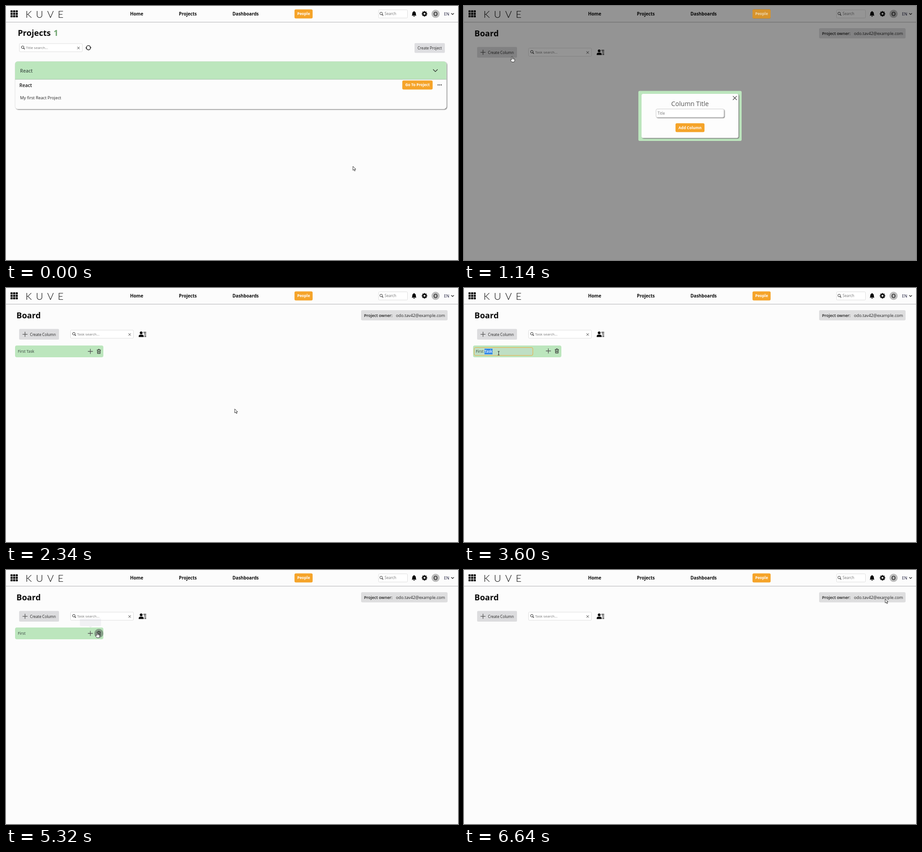
Animation, 998 px wide and 561 px high, one loop 6660 ms. Source, as an HTML page with a canvas:

```html
<!DOCTYPE html>
<html lang="en">
<head>
<meta charset="utf-8">
<title>Project board</title>
<style>
html, body { margin: 0; width: 100%; height: 100%; overflow: hidden; background: #fcfcfc; }
canvas { display: block; width: 998px; height: 561px; }
</style>
</head>
<body>
<canvas id="stage" width="998" height="561"></canvas>
<script>
const W = 998, H = 561, LOOP = 6660;
const BG = '#fcfcfc', ORANGE = '#f5a42a', GREEN = '#bce6bd', INK = '#0a0a0a';
const FONT = '"Open Sans", "Noto Sans", sans-serif';
const view = document.getElementById('stage').getContext('2d');
const page = document.createElement('canvas');
page.width = W;
page.height = H;
const pageCtx = page.getContext('2d');
let c = pageCtx;

const OPEN_BOARD = 560, FADE = 80;
const ADD = { open: 940, close: 2120 };
const DEL = { open: 5350, close: 6170 };
const EDIT = { start: 2860, select: 3160, erase: 3760, end: 4400 };

// time, x, y of the pointer tip
const PATH = [
  [0, 766, 354], [60, 766, 354], [400, 906, 172], [540, 906, 172], [880, 106, 111],
  [1230, 106, 111], [1420, 490, 238], [1810, 490, 238], [1960, 505, 267], [2360, 505, 267],
  [2640, 70, 142], [2960, 70, 142], [3060, 76, 144], [4780, 76, 144], [5000, 184, 138],
  [5200, 184, 138], [5300, 201, 137], [5450, 201, 137], [5740, 495, 245], [6190, 495, 245],
  [6580, 930, 64], [LOOP, 930, 64]
];
const POINTERS = [
  [0, 'arrow'], [360, 'hand'], [OPEN_BOARD, 'arrow'], [860, 'hand'], [1250, 'arrow'],
  [1390, 'beam'], [1850, 'arrow'], [1920, 'hand'], [2160, 'arrow'], [2600, 'beam'],
  [4800, 'arrow'], [4960, 'hand'], [5470, 'arrow'], [5690, 'hand'], [6200, 'arrow']
];
const ARROW = new Path2D('M0 0V9L2.1 7.1L3.7 10.4L5.2 9.7L3.7 6.5H6.4Z');
const HAND = new Path2D('M-1 1Q0 -.8 1 1V5Q2 4 3 5.1Q4 4.4 4.8 5.6Q6 5.2 6 6.8V9Q5.8 11 4.8 12.6H-.5Q-2 10.4 -3.6 8Q-3.3 6.3 -1 8Z');
const BELL = new Path2D('M0 -6Q1 -6 1 -5Q4 -4 4 0Q4 3 5.2 4H-5.2Q-4 3 -4 0Q-4 -4 -1 -5Q-1 -6 0 -6ZM-1.7 4.8H1.7Q1.3 6.4 0 6.4Q-1.3 6.4 -1.7 4.8Z');

const clamp = v => Math.max(0, Math.min(1, v));
const within = (t, a, b) => t >= a && t < b;

function text(s, x, y, size, weight = 400, color = INK, align = 'left') {
  c.font = `${weight} ${size}px ${FONT}`;
  c.textAlign = align;
  c.fillStyle = color;
  c.fillText(s, x, y + size * 0.357);
}

function box(x, y, w, h, r, fill, border) {
  c.beginPath();
  c.roundRect(x, y, w, h, r);
  if (fill) { c.fillStyle = fill; c.fill(); }
  if (border) { c.strokeStyle = border; c.lineWidth = 1; c.stroke(); }
}

function shadowBox(x, y, w, h, r, fill, border) {
  c.save();
  c.shadowColor = '#777';
  c.shadowOffsetX = c.shadowOffsetY = 1.5;
  c.shadowBlur = 2;
  box(x, y, w, h, r, fill);
  c.restore();
  if (border) box(x, y, w, h, r, null, border);
}

// each run is a flat list of x, y pairs
function lines(color, width, ...runs) {
  c.strokeStyle = color;
  c.lineWidth = width;
  c.beginPath();
  for (const p of runs) {
    c.moveTo(p[0], p[1]);
    for (let i = 2; i < p.length; i += 2) c.lineTo(p[i], p[i + 1]);
  }
  c.stroke();
}

function disc(x, y, r, color) {
  c.beginPath();
  c.arc(x, y, r, 0, 2 * Math.PI);
  c.fillStyle = color;
  c.fill();
}

const cross = (x, y, r, w, color = '#444') =>
  lines(color, w, [x - r, y - r, x + r, y + r], [x + r, y - r, x - r, y + r]);
const plus = (x, y, color = '#555') =>
  lines(color, 1.3, [x - 5.5, y, x + 5.5, y], [x, y - 5.5, x, y + 5.5]);

function button(label, x, y, w, h, size = 8.4) {
  box(x, y, w, h, 3, ORANGE);
  text(label, x + w / 2, y + h / 2, size, 700, '#fff', 'center');
}

function lens(x, y) {
  c.beginPath();
  c.arc(x - 0.7, y - 0.8, 2.8, 0, 2 * Math.PI);
  c.strokeStyle = '#222';
  c.lineWidth = 1;
  c.stroke();
  lines('#222', 1.2, [x + 1.3, y + 1.2, x + 3.8, y + 3.7]);
}

function searchField(label, x, y) {
  box(x + 0.5, y + 0.5, 139, 18, 2, '#fff', '#dedede');
  lens(x + 8.5, y + 9.3);
  text(label, x + 15, y + 10, 8, 400, '#757575');
  cross(x + 131, y + 10.2, 2.7, 1);
}

function gear(x, y) {
  c.save();
  c.translate(x, y);
  disc(0, 0, 4.5, INK);
  for (let i = 0; i < 8; i++) {
    c.fillRect(-1.4, -6, 2.8, 3);
    c.rotate(Math.PI / 4);
  }
  disc(0, 0, 2, BG);
  c.restore();
}

function navbar() {
  c.fillStyle = '#bdbfc1';
  c.fillRect(0, 35, W, 1);
  c.fillStyle = '#ececec';
  c.fillRect(0, 36, W, 1);
  for (let i = 0; i < 9; i++) box(10 + (i % 3) * 5.7, 9.5 + Math.floor(i / 3) * 5.5, 4.6, 4.5, 0.6, INK);
  c.font = '300 22px Lato, "Open Sans", sans-serif';
  c.textAlign = 'left';
  c.letterSpacing = '1.5px';
  c.fillText('K U V E', 43, 26);
  c.letterSpacing = '0px';
  text('Home', 288.5, 18, 9.8, 700, INK, 'center');
  text('Projects', 401.5, 18, 9.8, 700, INK, 'center');
  text('Dashboards', 529, 18, 9.8, 700, INK, 'center');
  button('People', 637, 7.5, 40, 20);
  box(822.5, 8.5, 64, 18, 2, '#fff', '#dedede');
  lens(829, 17.3);
  text('Search', 836, 17.5, 8.2, 400, '#757575');
  c.save();
  c.translate(901, 17.3);
  c.fillStyle = INK;
  c.fill(BELL);
  c.restore();
  gear(924, 17.3);
  disc(948.5, 17.3, 9, '#bcbcbc');
  text('O', 948.5, 17.5, 12, 600, '#222', 'center');
  text('EN', 967, 17.3, 9, 400, '#1d1d3c');
  lines('#222', 1.3, [983, 16, 986, 18.8, 989, 16]);
}

function refreshIcon(x, y) {
  c.strokeStyle = INK;
  c.lineWidth = 1.3;
  for (const a of [0, Math.PI]) {
    c.save();
    c.translate(x, y);
    c.rotate(a);
    c.beginPath();
    c.arc(0, 0, 4.7, -2.85, -0.2);
    c.stroke();
    c.beginPath();
    c.moveTo(2.6, -1);
    c.lineTo(6.6, -1);
    c.lineTo(4.7, 1.7);
    c.fillStyle = INK;
    c.fill();
    c.restore();
  }
}

function projects() {
  text('Projects', 26, 59.5, 18.1, 700);
  text('1', 105, 59.5, 18.1, 700, '#6fa56f');
  searchField('Title search...', 29, 82.5);
  refreshIcon(182, 92.2);
  box(902, 82, 67, 21.5, 2, '#dedee1');
  text('Create Project', 935.5, 93, 8.2, 400, '#222', 'center');
  shadowBox(20, 122.5, 952.5, 105, 6, BG, '#e3e3e3');
  box(20, 122.5, 952.5, 39.5, [6, 6, 0, 0], GREEN);
  c.fillStyle = '#a9bfae';
  c.fillRect(20, 161.5, 952.5, 1);
  text('React', 31, 143, 10.4, 600, '#42544a');
  lines('#222', 1.2, [943, 140, 948, 145, 953, 140]);
  text('React', 29.5, 175, 10.4, 600, '#161616');
  button('Go To Project', 875, 164.5, 67, 20, 8.3);
  for (let i = 0; i < 3; i++) disc(954 + i * 3.6, 174.3, 1.1, INK);
  text('My first React Project', 31, 203, 9.25, 400, '#222');
}

function trash(x, y) {
  lines('#333', 1.2, [x - 4.3, y - 3.2, x + 4.3, y - 3.2], [x - 1.5, y - 4.7, x + 1.5, y - 4.7],
    [x - 3.3, y - 3, x - 2.8, y + 4.7, x + 2.8, y + 4.7, x + 3.3, y - 3],
    [x - 1.1, y - 1, x - 1.1, y + 2.8], [x + 1.1, y - 1, x + 1.1, y + 2.8]);
}

function column(t) {
  const editing = within(t, EDIT.start, EDIT.end);
  const erased = t >= EDIT.erase;
  const iconY = editing ? 139 : 140;
  box(20, 127, 195, 26, 4, GREEN);
  if (editing) box(22.5, 131.5, 129.5, 17.5, 3, '#bfdfc4', '#eda83c');
  text(erased ? 'First' : 'First Task', 26, 140.5, 8.1, 600, '#53665a');
  const caret = 26 + c.measureText('First ').width;
  if (within(t, EDIT.select, EDIT.erase)) {
    const w = c.measureText('Task').width;
    c.fillStyle = '#2f86ea';
    c.fillRect(caret, 134, w + 0.5, 12.5);
    text('Task', caret, 140.5, 8.1, 600, '#fff');
  } else if (editing && erased && t % 1000 < 500) {
    lines('#333', 1, [caret, 136, caret, 145]);
  }
  if (within(t, 4980, 5250)) disc(186.5, 140, 10, 'rgba(90,100,95,.5)');
  if (within(t, 5260, DEL.open + FADE)) disc(205, 140, 10, 'rgba(90,100,95,.55)');
  plus(186.3, iconY);
  trash(205, iconY);
  const tip = Math.min(clamp((t - 5000) / 100), clamp((5330 - t) / 100));
  if (tip > 0) {
    c.globalAlpha = tip * 0.7;
    box(163, 107, 47, 17, 3, '#656a8a');
    c.beginPath();
    c.moveTo(183, 124);
    c.lineTo(186.5, 128);
    c.lineTo(190, 124);
    c.fill();
    text('Add Task', 186.5, 116, 8.2, 400, '#fff', 'center');
    c.globalAlpha = 1;
  }
}

function board(t) {
  text('Board', 23, 61, 18.1, 700);
  box(784, 49, 191, 22.5, 3, '#dededf');
  text('Project owner:', 790.5, 60.5, 9, 600, '#1b1b1b');
  text('odo.tav42@example.com', 861, 60.5, 9.2, 400, '#222');
  box(29, 90.5, 88, 23.5, 2, '#dcdcde');
  plus(42, 102.3);
  text('Create Column', 53, 103, 8.2, 400, '#222');
  searchField('Task search...', 142, 92.5);
  disc(298.5, 99, 3.1, INK);
  box(293, 103, 11, 5.3, [4, 4, 0, 0], INK);
  lines(INK, 1.4, [303.5, 97.7, 309.5, 97.7], [304.5, 100.9, 309.5, 100.9],
    [305.5, 104.1, 309.5, 104.1], [305.5, 107.3, 309.5, 107.3]);
  if (within(t, ADD.close, DEL.close)) column(t);
}

function dialog(t, adding) {
  const h = adding ? 110.5 : 84.5;
  box(385, 187.5, 228, h, 3, GREEN);
  shadowBox(392, 194, 214, h - 13, 4, '#fdfdfd');
  cross(598, 203.2, 4.3, 1.2);
  if (!adding) {
    text('Are You sure?', 499, 215.5, 13.8, 400, '#555', 'center');
    button('Delete', 479, 233, 40, 19.5, 8.3);
    return;
  }
  text('Column Title', 499, 215.5, 14.1, 400, '#555', 'center');
  shadowBox(424, 227.5, 150, 18.5, 3, '#fff', '#ccc');
  const typed = 'First Task'.slice(0, Math.max(0, Math.floor((t - 1460) / 36)));
  text(typed || 'Title', 427.5, 237.3, 8.1, 400, typed ? '#222' : '#757575');
  if (typed && t < 1950) {
    const x = 428 + c.measureText(typed).width;
    lines('#222', 1, [x, 232.5, x, 242]);
  }
  button('Add Column', 467, 259, 64, 19.5);
}

function pointer(t) {
  const i = Math.max(1, PATH.findIndex(p => p[0] > t));
  const [t0, x0, y0] = PATH[i - 1], [t1, x1, y1] = PATH[i];
  const k = clamp((t - t0) / (t1 - t0)), e = k * k * (3 - 2 * k);
  const kind = POINTERS.filter(p => p[0] <= t).pop()[1];
  c.save();
  c.translate(x0 + (x1 - x0) * e, y0 + (y1 - y0) * e);
  if (kind === 'beam') {
    lines('#222', 1, [0.5, -4, 0.5, 4], [-1.5, -4, 2.5, -4], [-1.5, 4, 2.5, 4]);
  } else {
    const shape = kind === 'hand' ? HAND : ARROW;
    c.fillStyle = '#fff';
    c.fill(shape);
    c.strokeStyle = '#222';
    c.lineWidth = 0.9;
    c.stroke(shape);
    if (kind === 'hand') lines('#222', 0.6, [1, 5, 1, 7.5], [2.9, 5.2, 2.9, 7.5], [4.6, 5.7, 4.6, 7.7]);
  }
  c.restore();
}

const shown = (t, d) => Math.min(clamp((t - d.open) / FADE), clamp((d.close + FADE - t) / FADE));

function backdrop(alpha) {
  c.globalAlpha = alpha;
  c.filter = 'blur(0.6px)';
  c.drawImage(page, 0, 0);
  c.filter = 'none';
  c.fillStyle = 'rgba(0,0,0,.415)';
  c.fillRect(0, 0, W, H);
  box(637, 7.5, 40, 20, 3, '#d8942c');
  text('People', 657, 17.5, 8.4, 700, '#ecd6ae', 'center');
}

function draw(t) {
  c = pageCtx;
  c.fillStyle = BG;
  c.fillRect(0, 0, W, H);
  navbar();
  if (t < OPEN_BOARD) projects();
  else board(t);
  c = view;
  c.drawImage(page, 0, 0);
  const add = shown(t, ADD), del = shown(t, DEL);
  if (add > 0 || del > 0) {
    backdrop(Math.max(add, del));
    dialog(t, add > 0);
    c.globalAlpha = 1;
  }
  pointer(t);
}

let start;
function tick(now) {
  start ??= now;
  draw((now - start) % LOOP);
  requestAnimationFrame(tick);
}
requestAnimationFrame(tick);
</script>
</body>
</html>
```
